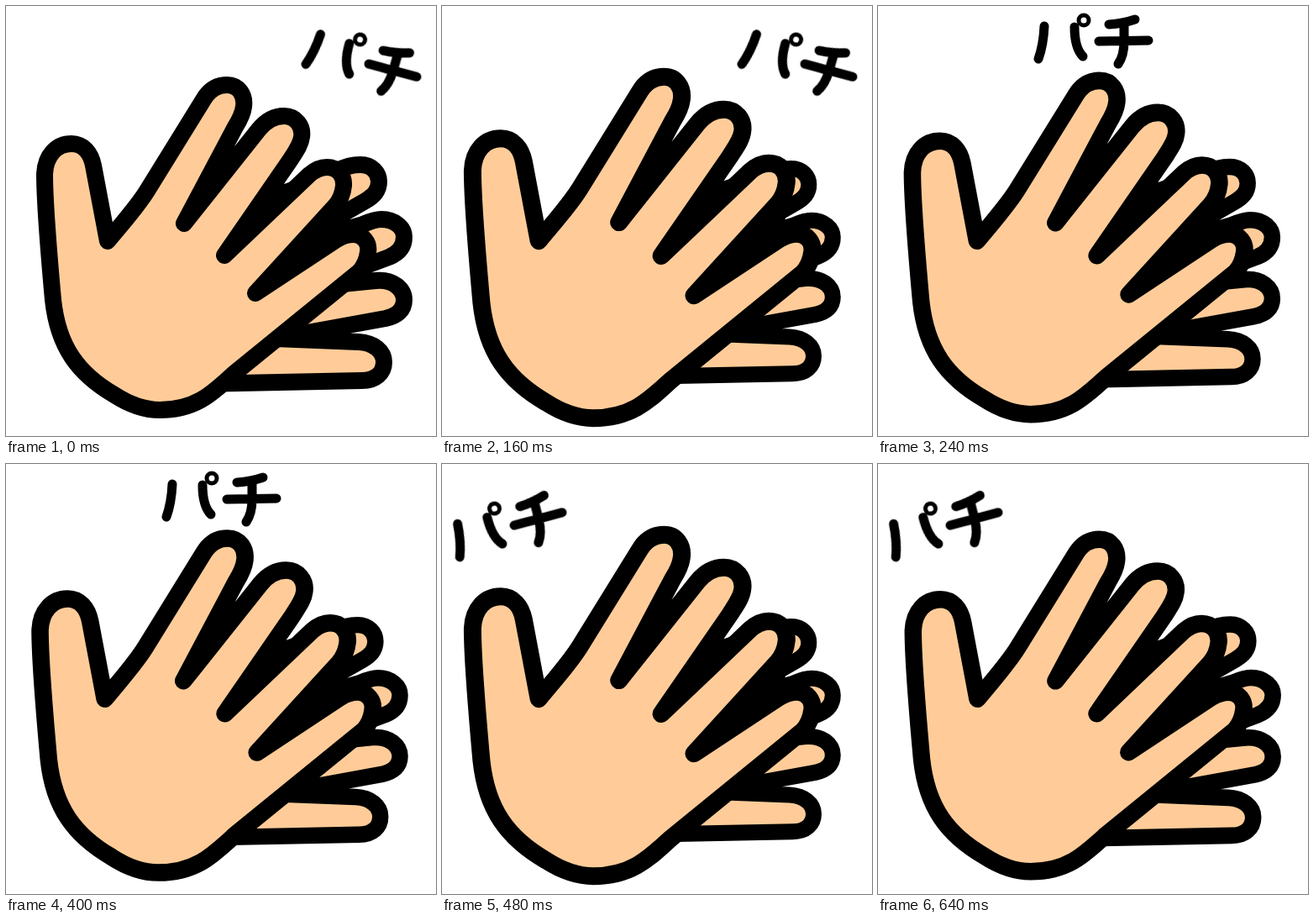
An HTML page for the animation above (0.72 s loop, 512 by 512 pixels).

```html
<!DOCTYPE html>
<html lang="ja">
<head>
<meta charset="utf-8">
<title>Clapping hands</title>
<style>
  @property --spread {
    syntax: "<number>";
    inherits: true;
    initial-value: 0;
  }
  html, body {
    margin: 0;
    width: 100%;
    height: 100%;
    overflow: hidden;
    background: #fff;
  }
  svg {
    display: block;
    width: 100%;
    height: 100%;
    animation: clap 720ms step-end infinite;
  }
  .hand {
    fill: #fc9;
    stroke: #000;
    stroke-width: 20;
    stroke-linejoin: round;
  }
  .front {
    transform-origin: 238px 287px;
    transform: scale(calc(1 + .05 * var(--spread)));
  }
  .back {
    transform-origin: 300px 280px;
    transform: scale(calc(1 - .05 * var(--spread)));
  }
  .sound {
    fill: none;
    stroke: #000;
    stroke-width: 11;
    stroke-linecap: round;
    stroke-linejoin: round;
    animation: hop 720ms step-end infinite;
  }
  .sound circle { stroke-width: 5; }

  /* two claps; the hands move in 80 ms steps */
  @keyframes clap {
    0%     { --spread: 0; }
    11.11% { --spread: .5; }
    22.22% { --spread: 1; }
    33.33% { --spread: .53; }
    44.44% { --spread: .06; }
    55.55% { --spread: .57; }
    66.66% { --spread: 1; }
    77.77% { --spread: .73; }
    88.88% { --spread: .44; }
    100%   { --spread: 0; }
  }
  @keyframes hop {
    0%     { transform: translate(432px, 69px) rotate(16deg); }
    33.33% { transform: translate(263px, 42px); }
    66.66% { transform: translate(86px, 73px) rotate(-14deg); }
    100%   { transform: translate(432px, 69px) rotate(16deg); }
  }
</style>
</head>
<body>
<svg viewBox="0 0 512 512" role="img" aria-label="パチ">
  <path class="hand back" d="M300 300 L395 196 C404 191 412 189 422 189
    C436 189 444 199 444 209 C444 220 438 226 428 232 L330 288
    L425 260 C432 257 440 254 447 254 C463 254 474 264 474 275
    C474 286 468 294 456 299 L320 350
    L400 331 L440 327 C461 325 474 337 474 350 C474 362 466 369 452 372 L320 396
    L420 400 C438 401 450 411 450 424 C450 437 440 446 424 446 L250 449.5 Z"/>

  <g class="front">
    <path d="M260 297 L338 184 L331 212 L362 201 Z M297 342 L388 235 L402 250 L394 278 Z"/>
    <path class="hand" d="M46 200 C47 178 60 164 78 164 C92 164 101 175 104 190
      L121 280 C140 257 157 238 168 220
      L236 110 C243 99 252 94 263 94 C277 94 285 106 283 120
      C282 128 278 136 273 144 L212 259
      L301 147 C310 136 320 131 331 131 C345 131 354 143 352 156
      C351 165 345 173 338 184 L260 297
      L361 201 C369 194 375 192 382 192 C395 192 403 202 402 214
      C401 224 398 231 392 238 L297 342
      L394 278 C402 273 408 272 414 272 C425 272 433 282 431 293
      C430 301 427 309 421 316
      L271 438 C246 461 226 481 183 481 C163 481 146 474 129 463
      C86 438 62 406 56 350 C52 305 46 240 46 200 Z"/>
  </g>

  <g class="sound">
    <path d="M-65 -18 Q-66 4 -72 21 M-29 -17 Q-29 8 -19 18"/>
    <circle cx="-18" cy="-25" r="6"/>
    <path d="M43 -26 Q28 -21 12 -20 M0 0 L59 -1 M30 -20 V0 Q30 17 23 27"/>
  </g>
</svg>
</body>
</html>
```
